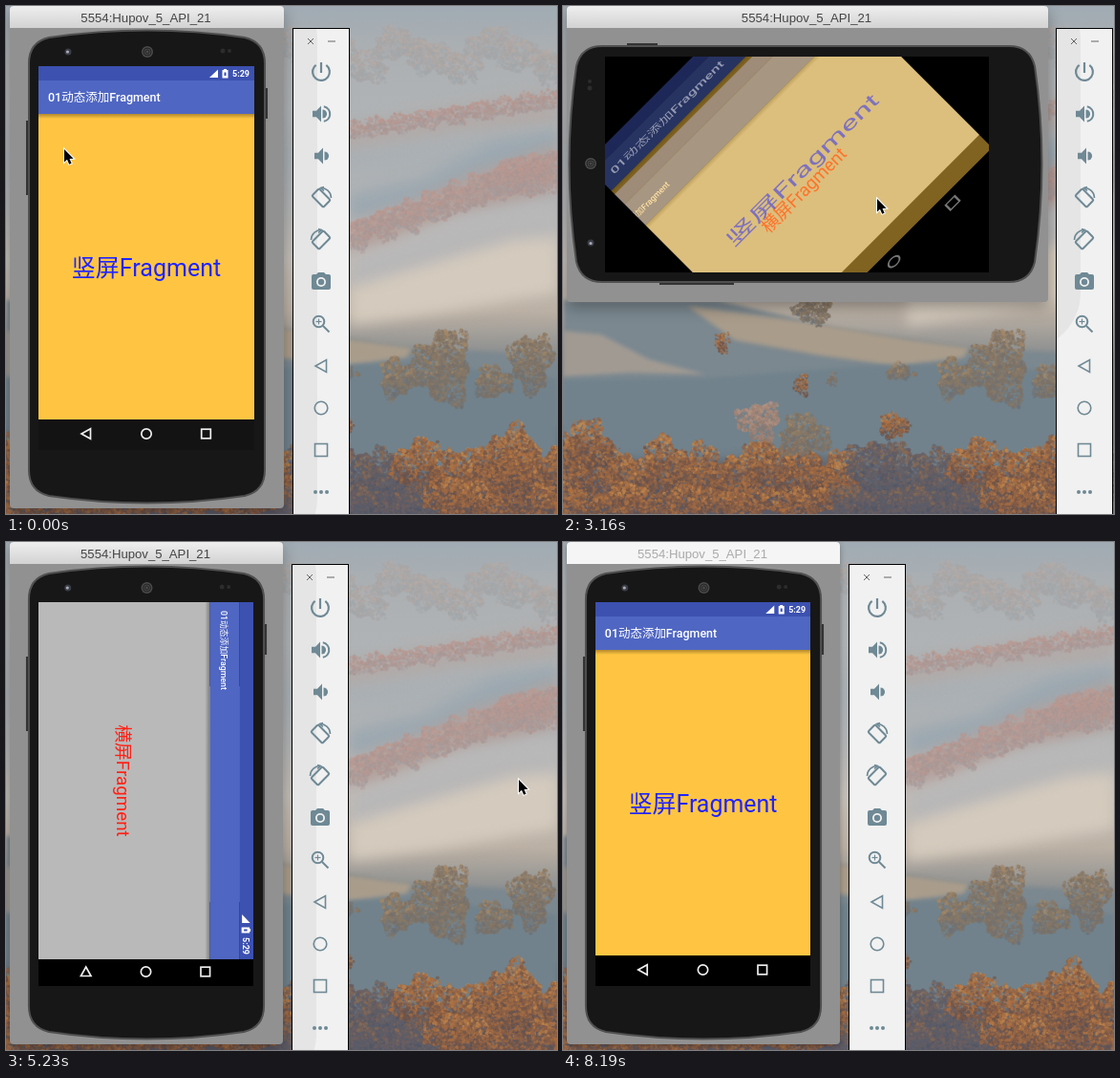
An HTML page with a canvas that plays this animation: 577 px wide and 532 px high, repeating every 8290 ms.

```html
<!DOCTYPE html>
<html lang="zh">
<head>
<meta charset="utf-8">
<style>
  html, body { margin: 0; width: 100%; height: 100%; overflow: hidden; }
  canvas { display: block; }
</style>
</head>
<body>
<canvas id="stage" width="577" height="532"></canvas>
<script>
const W = 577, H = 532, LOOP = 8290, TAU = Math.PI * 2;
const SANS = 'Roboto, "Noto Sans CJK SC", "Noto Sans CJK", sans-serif';
const ICON = '#6f8995';
const stage = document.getElementById('stage').getContext('2d');
const scene = document.createElement('canvas');
scene.width = W; scene.height = H;
let g = stage;

const lerp = (a, b, u) => a + (b - a) * u;
// Rises from 0 to 1 in n equal jumps, the first at a and the last at b.
const stairs = (t, a, b, n) => t < a ? 0 : Math.min(1, (Math.floor((t - a + .01) * (n - 1) / (b - a)) + 1) / n);

function rect(color, x, y, w, h) { g.fillStyle = color; g.fillRect(x, y, w, h); }
function trace(points, close = true) {
  g.beginPath();
  for (let i = 0; i < points.length; i += 2) g.lineTo(points[i], points[i + 1]);
  if (close) g.closePath();
}
function poly(color, ...points) { trace(points); g.fillStyle = color; g.fill(); }
function line(...points) { trace(points, false); g.stroke(); }
function arc(x, y, r, from = 0, to = TAU) { g.beginPath(); g.arc(x, y, r, from, to); }
function dot(color, x, y, r) { arc(x, y, r); g.fillStyle = color; g.fill(); }
function shade(y0, y1, ...colors) {
  const fill = g.createLinearGradient(0, y0, 0, y1);
  colors.forEach((c, i) => fill.addColorStop(i / (colors.length - 1), c));
  return fill;
}
function text(str, x, y, color, font, align = 'left') {
  g.font = font; g.fillStyle = color; g.textAlign = align; g.fillText(str, x, y);
}
function local(draw) { g.save(); draw(); g.restore(); }

// ---- Wallpaper, painted once ----
let seed = 77;
const random = () => (seed = seed * 16807 % 2147483647) / 2147483647;

// An uneven crown of soft dots; colours run from the lit top to the shaded foot.
function foliage(x, y, w, h, colors, size = 2.2) {
  const count = w * h / (size * 2.2);
  for (let i = 0; i < count; i++) {
    const a = random() * TAU;
    const r = Math.sqrt(random()) * (.42 + .08 * Math.sin(3 * a + x) + .05 * Math.sin(7 * a + y));
    const v = Math.sin(a) * r;
    const tone = Math.min(.99, random() * .6 + (v + .5) * .4);
    dot(colors[Math.floor(tone * colors.length)], x + Math.cos(a) * r * w, y + v * h, size * (.4 + random() * .6));
  }
}

function paintScene() {
  g = scene.getContext('2d');
  rect(shade(0, H, '#a0abb3', '#adb0b2', '#b0b3b5', '#aab0b4', '#b3b4b5', '#c3beb7', '#bbb0a4', '#83898c', '#71818b', '#626f7a', '#57596a'), 0, 0, W, H);
  g.filter = 'blur(7px)';
  poly('#b1aaa8', 290, 135, 360, 126, 450, 108, 577, 88, 577, 122, 470, 132, 360, 150);
  poly('#9ca8b0', 360, 198, 440, 180, 510, 142, 577, 130, 577, 165, 460, 200, 360, 225);
  poly('#b4a19b', 360, 232, 430, 204, 490, 176, 577, 146, 577, 196, 480, 216, 400, 250, 360, 262);
  poly('#b9b8b8', 360, 262, 470, 222, 577, 202, 577, 260, 440, 290, 360, 300);
  poly('#d4cabd', 360, 296, 440, 272, 530, 246, 577, 242, 577, 300, 450, 322, 360, 334);
  g.filter = 'blur(2px)';
  poly('#7b8890', 0, 308, 160, 308, 290, 338, 420, 358, 577, 366, 577, 440, 0, 440);
  poly('#a99c8b', 130, 314, 250, 330, 360, 349, 425, 358, 420, 368, 350, 377, 270, 366, 180, 350);
  poly('#a19a92', 0, 340, 40, 344, 90, 370, 150, 386, 70, 384, 0, 388);
  poly('#71828c', 0, 392, 150, 390, 300, 378, 430, 374, 577, 390, 577, 500, 0, 500);
  g.filter = 'none';
  g.globalAlpha = .45;
  const haze = ['#b8aaa5', '#a9a6a6', '#a0a8ae'];
  const pink = ['#c09a8e', '#b79a92', '#a99794', '#a3a0a1'];
  const olive = ['#a38767', '#8b7966', '#7b7168', '#6c7176'];
  const amber = ['#c58a4e', '#ad7243', '#8e6046', '#6e5349', '#585159'];
  const dusk = ['#8c6a52', '#6b5f60', '#5b5d69', '#505768'];
  for (let i = 0; i < 9; i++) {
    foliage(310 + i * 33, 40 + i % 3 * 12, 60, 40, haze, 2);
    foliage(365 + i * 26, 130 - i * 4, 40, 24, pink, 1.8);
    foliage(368 + i * 26, 238 - i * 9, 42, 40, pink, 2);
  }
  foliage(540, 180, 90, 50, pink, 2);
  g.globalAlpha = .6;
  foliage(262, 319, 46, 34, olive);
  foliage(167, 353, 18, 28, amber, 1.6);
  foliage(250, 397, 18, 28, amber, 1.6);
  foliage(282, 391, 12, 18, olive, 1.6);
  foliage(352, 383, 34, 20, olive);
  foliage(410, 390, 44, 48, olive);
  foliage(457, 378, 72, 90, olive);
  foliage(550, 373, 54, 72, olive);
  foliage(510, 394, 46, 40, olive);
  g.filter = 'blur(5px)';
  poly('#5c5a64', -20, 470, 120, 476, 260, 470, 400, 488, 597, 478, 597, 552, -20, 552);
  g.filter = 'none';
  for (let i = 0; i < 17; i++) foliage(i * 36, 484 + i % 3 * 7, 62, 72, i > 8 && i < 12 ? dusk : amber);
  for (let i = 0; i < 10; i++) foliage(i * 62, 522, 80, 46, i > 4 && i < 8 ? dusk : amber);
  foliage(205, 435, 52, 46, ['#b39384', '#a38676', '#8d7a70']);
  foliage(252, 450, 62, 52, olive);
  foliage(347, 440, 40, 30, amber);
  foliage(25, 462, 66, 62, amber);
  foliage(526, 482, 68, 98, amber);
  foliage(463, 516, 54, 52, amber);
  g = stage;
}

// ---- App screen, centred on the current point ----
function backIcon(x, y) { trace([x - 5, y, x + 4.5, y - 5.3, x + 4.5, y + 5.3]); g.stroke(); }

function app(upright, navColor) {
  const w = upright ? 226 : 402, h = upright ? 402 : 226;
  const cw = upright ? 226 : 374, ch = upright ? 370 : 226, bar = upright ? 50 : 46;
  local(() => {
    g.translate(-w / 2, -h / 2);
    // The areas never overlap, so the whole screen can be faded.
    if (upright) rect(navColor, 0, ch, w, h - ch); else rect(navColor, cw, 0, w - cw, h);
    rect('#3c51b0', 0, 0, cw, 15);
    rect('#4f66c2', 0, 15, cw, bar - 15);
    rect(upright ? '#ffc542' : '#b9b9b9', 0, bar, cw, ch - bar);
    rect(shade(bar, bar + 5, 'rgba(0,0,0,.3)', 'rgba(0,0,0,0)'), 0, bar, cw, 5);
    poly('#fff', cw - 47, 12, cw - 38, 12, cw - 38, 3.5);
    rect('#fff', cw - 33.5, 4, 6, 8.5);
    rect('#fff', cw - 32, 3, 3, 1);
    rect('#3c51b0', cw - 31.5, 6.5, 2, 3.5);
    text('5:29', cw - 23, 11, '#fff', '700 9px ' + SANS);
    text('01动态添加Fragment', upright ? 10 : 9, upright ? 37.3 : 34.3, '#fff', `500 ${upright ? 12.5 : 8.8}px ${SANS}`);
    if (upright) text('竖屏Fragment', 113, 220, '#2024ff', '25px ' + SANS, 'center');
    else text('横屏Fragment', 187, 143.5, '#ff2015', '18.8px ' + SANS, 'center');
    g.strokeStyle = '#eee'; g.lineWidth = 1.7;
    const [x, y] = upright ? [113, 385] : [387, 113];
    arc(x, y, 5.2); g.stroke();
    if (upright) { backIcon(x - 63, y); g.strokeRect(x + 57.7, y - 4.8, 9.6, 9.6); }
    else { backIcon(x, y + 63); g.strokeRect(x - 4.8, y - 67.3, 9.6, 9.6); }
  });
}

// The old layout turns, stretches and fades out over the turning new one,
// which is uncovered only as far as the old one has grown.
function screen(upright, p, navColor) {
  const w = upright ? 226 : 402, h = 628 - w, side = upright ? 1 : -1;
  local(() => {
    g.translate(upright ? 147 : 245, upright ? 264 : 166);
    g.beginPath(); g.rect(-w / 2, -h / 2, w, h); g.clip();
    rect('#000', -w / 2, -h / 2, w, h);
    g.rotate(side * (1 - p) * Math.PI / 2);
    const sx = lerp(1, w / h, p), sy = lerp(1, h / w, p);
    local(() => {
      g.beginPath(); g.rect(-h * sx / 2, -w * sy / 2, h * sx, w * sy); g.clip();
      app(upright, navColor);
    });
    if (p < 1) {
      g.globalAlpha = 1 - p;
      g.scale(sx, sy);
      app(!upright, navColor);
    }
  });
}

function phoneBody() {
  rect('#333', 21, 120, 4, 78);
  rect('#333', 270, 86, 4, 32);
  g.beginPath();
  g.moveTo(24, 60);
  g.quadraticCurveTo(24, 38, 45, 33); g.quadraticCurveTo(148, 18, 250, 33); g.quadraticCurveTo(271, 38, 271, 60);
  g.lineTo(271, 486);
  g.quadraticCurveTo(271, 508, 250, 513); g.quadraticCurveTo(148, 528, 45, 513); g.quadraticCurveTo(24, 508, 24, 486);
  g.closePath();
  g.fillStyle = '#171717'; g.fill();
  g.strokeStyle = '#505050'; g.lineWidth = 2; g.stroke();
  dot('#3a3d44', 65, 48, 3.5);
  dot('#aab', 64.5, 48, 1.6);
  dot('#4a4a4a', 148, 48, 6);
  g.strokeStyle = '#222'; g.lineWidth = 1;
  for (const r of [2, 4]) { arc(148, 48, r); g.stroke(); }
  dot('#2c2c2c', 227, 47, 2.5);
  dot('#2c2c2c', 234, 47, 2);
}

function emulator(upright, p, t, shadow) {
  const w = upright ? 287 : 504, h = upright ? 526 : 310;
  local(() => {
    if (upright && t > 2000) { g.translate(4, 0); g.scale(286 / 287, 1); g.translate(-4, 0); }
    g.beginPath(); g.roundRect(4, 0, w, h, 4);
    g.shadowColor = 'rgba(0,0,0,.3)'; g.shadowBlur = shadow ? 16 : 6; g.shadowOffsetY = shadow ? 6 : 2;
    g.fillStyle = '#919191'; g.fill();
    g.shadowColor = 'transparent';
    const inactive = t >= 8190;
    g.beginPath(); g.roundRect(4, 0, w, 23, [4, 4, 0, 0]);
    g.fillStyle = inactive ? '#f5f5f5' : shade(0, 23, '#efefef', '#d2d2d2'); g.fill();
    text('5554:Hupov_5_API_21', 3 + w / 2, 17, inactive ? '#aaa' : '#444', '13.2px "Liberation Sans", sans-serif', 'center');
    local(() => {
      if (!upright) g.transform(0, -1, 1, 0, -19, 313);
      phoneBody();
    });
    screen(upright, p, t < 1660 ? '#131313' : '#000');
  });
}

// ---- Side toolbar ----
function speaker(x) { poly(ICON, x - 9, -3.2, x - 5, -3.2, x, -8.5, x, 8.5, x - 5, 3.2, x - 9, 3.2); }
function wave(x) { arc(x, 0, 4.6, -Math.PI / 2, Math.PI / 2); g.fillStyle = ICON; g.fill(); }
function turn(side) {
  g.scale(side, 1);
  arc(0, 0, 10.5, -1.6, 0); g.stroke();
  line(3, -7.5, -.5, -10.5, 3, -11.5);
  g.rotate(-Math.PI / 4);
  g.lineWidth = 2;
  g.beginPath(); g.roundRect(-5.3, -8.5, 10.6, 17, 1.5); g.stroke();
}
const icons = [
  () => { g.lineWidth = 2.2; arc(0, 0, 8.9, -.93, Math.PI + .93); g.stroke(); line(0, -10, 0, 1); },
  () => { speaker(0); wave(1.5); g.lineWidth = 2; arc(1.5, 0, 7.8, -1.4, 1.4); g.stroke(); },
  () => { speaker(2); wave(3.5); },
  () => turn(1),
  () => turn(-1),
  () => {
    g.fillStyle = ICON;
    g.beginPath(); g.roundRect(-10, -8, 20, 16, 2); g.fill();
    poly(ICON, -5, -8, -3, -10, 3, -10, 5, -8);
    dot('#f1f1f1', 0, 0, 5); dot(ICON, 0, 0, 3.2);
  },
  () => { g.lineWidth = 2; arc(-2.5, -2.5, 5.8); g.stroke(); line(2, 2, 8.5, 8.5); g.lineWidth = 1.2; line(-5.5, -2.5, .5, -2.5); line(-2.5, -5.5, -2.5, .5); },
  () => { trace([-6, 0, 5.5, -6.5, 5.5, 6.5]); g.stroke(); },
  () => { arc(0, 0, 6.8); g.stroke(); },
  () => g.strokeRect(-6.5, -6.5, 13, 13),
  () => [-6, 0, 6].forEach(x => dot(ICON, x, 0, 2)),
];

function toolbar(x, upright, shadow) {
  local(() => {
    g.translate(x, 0);
    rect('#f1f1f1', 0, 23, 60, 520);
    if (shadow) local(() => {
      g.beginPath(); g.rect(0, 23, 60, 520); g.clip();
      g.beginPath(); g.roundRect(-100, -25, 126, upright ? 601 : 385, 60);
      g.fillStyle = 'rgba(0,0,0,.05)'; g.fill();
    });
    g.strokeStyle = '#000'; g.lineWidth = 1;
    g.strokeRect(.5, 23.5, 59, 520);
    g.strokeStyle = '#666';
    line(16, 34, 22, 40); line(22, 34, 16, 40); line(37, 37, 45, 37);
    icons.forEach((draw, i) => local(() => {
      g.translate(30, 69 + 44 * i);
      g.strokeStyle = ICON; g.lineWidth = 1.6;
      draw();
    }));
  });
}

// ---- Mouse pointer ----
function pointerAt(t) {
  if (t < 1360) {
    const u = stairs(t, 180, 1220, 8);
    return [61 + 269 * u, 150 + 53 * u + 34 * Math.sin(Math.PI * u)];
  }
  if (t < 2110) return [330, 203];
  if (t < 4350) {
    const u = stairs(t, 3310, 4200, 7);
    return [lerp(329, 478, u), lerp(202, 195, u)];
  }
  if (t < 6430) {
    const u = stairs(t, 4350, 4790, 4);
    return [lerp(478, 537, u), lerp(195, 249, u)];
  }
  if (t < 7330) {
    const u = stairs(t, 6580, 7180, 5);
    return [lerp(537, 571, u), lerp(249, 456, u * u)];
  }
  return t >= 7480 && t < 7630 ? [569, 527] : null;
}

function pointer(at) {
  if (!at) return;
  local(() => {
    g.translate(...at);
    trace([0, 0, 0, 13.5, 3, 10.8, 5.2, 15.8, 7.6, 14.8, 5.5, 9.9, 9.6, 9.7]);
    g.lineWidth = 2; g.strokeStyle = '#fff'; g.stroke();
    g.fillStyle = '#000'; g.fill();
  });
}

function turnProgress(t) {
  if (t < 1660 || t >= 6580) return 1;
  if (t >= 6430) return .82;
  if (t >= 5085 || t < 3160) return 0;
  return t < 3310 ? .5 : t < 3460 ? .93 : 1;
}
// The portrait layout that follows a sideways landscape one needs p = 0, a
// finished landscape one p = 1; between 1660 and 3160 the old layout covers all.

function draw(t) {
  const upright = t < 1660 || t >= 5085;
  const shadow = !(t >= 1360 && t < 1660 || t >= 4790 && t < 5085 || t >= 8190);
  g.drawImage(scene, 0, 0);
  emulator(upright, turnProgress(t), t, shadow);
  toolbar(!upright ? 516 : t < 1660 ? 300 : 299, upright, shadow);
  pointer(pointerAt(t));
}

paintScene();
const start = performance.now();
function tick() {
  draw((performance.now() - start) % LOOP);
  requestAnimationFrame(tick);
}
tick();
</script>
</body>
</html>
```
